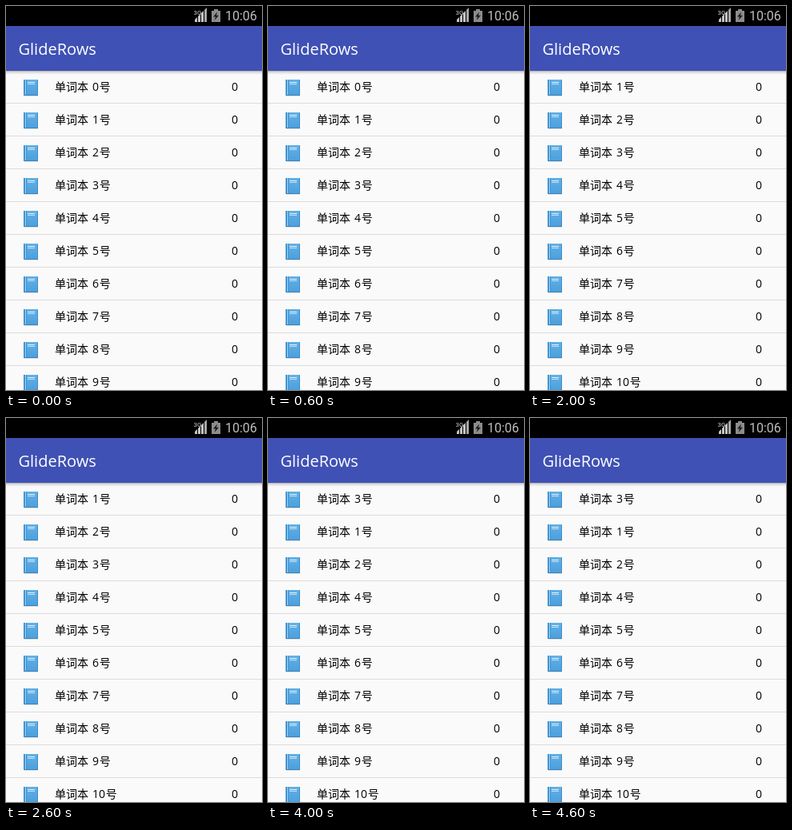
An HTML page with a canvas that plays this animation: 320x480 px, repeating every 5 s.

```html
<!DOCTYPE html>
<html lang="zh">
<head>
<meta charset="utf-8">
<title>GlideRows</title>
<style>
html, body { margin: 0; width: 100%; height: 100%; overflow: hidden; background: #fafafa; }
canvas { display: block; width: 320px; height: 480px; }
</style>
</head>
<body>
<canvas id="stage"></canvas>
<script>
const W = 320, H = 480, TOP = 81, PITCH = 41, STEP = 1000;
const LATIN = '"Open Sans", "Noto Sans", sans-serif';
const HAN = '"Noto Sans CJK SC", "Noto Sans CJK", sans-serif';

const canvas = document.getElementById('stage');
const ratio = window.devicePixelRatio || 1;
canvas.width = W * ratio;
canvas.height = H * ratio;
const ctx = canvas.getContext('2d');
ctx.scale(ratio, ratio);

const count = from => Array.from({ length: 10 }, (_, i) => from + i);

// Each state: the list order and the index of the opened row
const states = [
  { list: count(0), open: -1 },
  { list: count(0), open: 0 },
  { list: count(1), open: -1 },
  { list: count(1), open: 2 },
  { list: [3, 1, 2, ...count(4)], open: -1 }
];

function rect(color, x, y, w, h) {
  ctx.fillStyle = color;
  ctx.fillRect(x, y, w, h);
}

function shape(color, points) {
  ctx.fillStyle = color;
  ctx.beginPath();
  points.forEach(([x, y]) => ctx.lineTo(x, y));
  ctx.fill();
}

function text(str, x, y, size, family, color) {
  ctx.font = size + 'px ' + family;
  ctx.fillStyle = color;
  ctx.fillText(str, x, y);
}

function book(x, y) {
  rect('rgba(0,0,0,.12)', x + 1, y + 20, 17, 1);
  rect('#4a9edb', x, y, 18, 20);
  const g = ctx.createLinearGradient(0, y, 0, y + 20);
  g.addColorStop(0, '#62b1e6');
  g.addColorStop(1, '#4c9fdc');
  rect(g, x + 4, y, 13, 20);
  rect('#3b8ac8', x, y, 1, 20);
  rect('#9ccfee', x + 2, y, 1, 20);
  rect('#3f8fcd', x + 3, y, 1, 20);
  rect('#3f8fcd', x + 17, y + 1, 1, 19);
  rect('#e4f2fb', x + 5, y + 3, 9, 1);
  rect('#c2e1f5', x + 5, y + 5, 9, 1);
  rect('#3985c0', x, y + 19, 18, 1);
}

function row(n, y, shift) {
  const x = -shift, base = y + 25, label = String(n);
  book(x + 22, y + 11);
  text('单词本', x + 61, base, 14, HAN, '#000');
  text(label, x + 108, base, 14, LATIN, '#000');
  text('号', x + 108.7 + 8 * label.length, base, 14, HAN, '#000');
  text('0', x + 282, base, 14, LATIN, '#000');
  if (shift) {
    rect('#f2d003', 200, y, 60, 40);
    rect('#ff1f3a', 260, y, 60, 40);
    text('置顶', 216, base, 14, HAN, '#fff');
    text('删除', 276, base, 14, HAN, '#fff');
  }
  rect('#dcdcdc', 0, y + 40, W, 1);
}

function statusBar() {
  rect('#000', 0, 0, W, 25);
  text('3G', 234.5, 11, 8, 'Roboto, sans-serif', '#d0d0d0');
  for (let i = 0; i < 4; i++) {
    const x = 236 + i * 4, h = 3 + i * 4;
    shape(i < 3 ? '#c4c4c4' : '#a8a8a8',
      [[x, 20], [x, 20 - h], [x + 3, 17 - h], [x + 3, 20]]);
  }
  rect('#8c8c8c', 260, 4, 5, 2);
  rect('#8c8c8c', 257, 6, 11, 14);
  shape('#1c1c1c', [[264, 7.5], [259, 13.5], [262, 13.5], [260.5, 18], [266, 11.8], [263, 11.8]]);
  text('10:06', 274, 18, 16, 'Roboto, sans-serif', '#bebebe');
}

function header() {
  rect('#3f51b5', 0, 25, W, 56);
  const g = ctx.createLinearGradient(0, TOP, 0, TOP + 5);
  g.addColorStop(0, 'rgba(0,0,0,.3)');
  g.addColorStop(.4, 'rgba(0,0,0,.1)');
  g.addColorStop(1, 'rgba(0,0,0,0)');
  rect(g, 0, TOP, W, 5);
  text('GlideRows', 15.5, 61, 20, LATIN, '#fff');
}

function draw() {
  const { list, open } = states[Math.floor(performance.now() / STEP) % states.length];
  rect('#fafafa', 0, 0, W, H);
  list.slice(0, 10).forEach((n, i) => row(n, TOP + i * PITCH, i === open ? 120 : 0));
  header();
  statusBar();
  requestAnimationFrame(draw);
}
draw();
</script>
</body>
</html>
```
